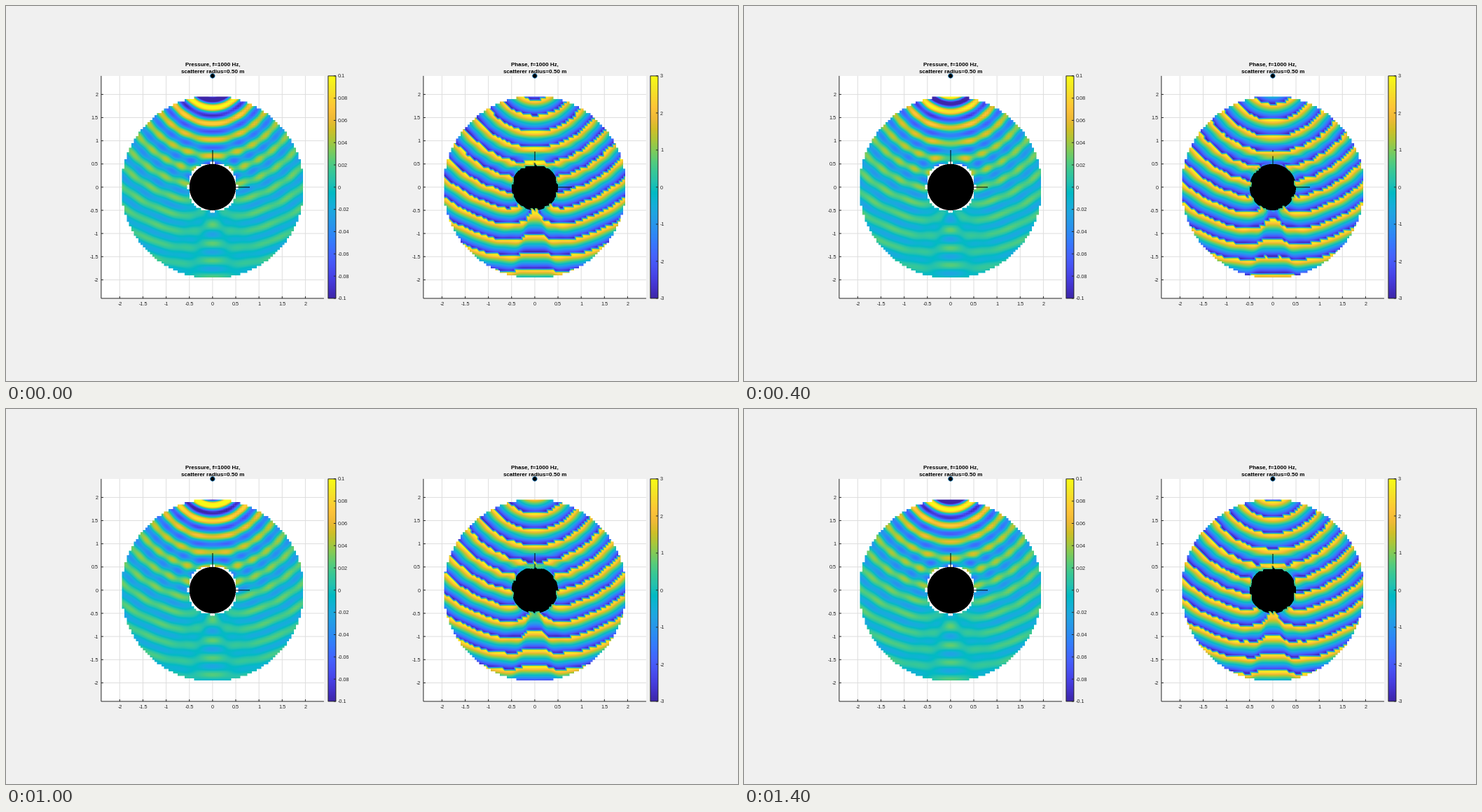
These frames come from a looping animation (1045x536 px, 1.5 s). A matplotlib script:

```python
import numpy as np
import matplotlib.pyplot as plt
from matplotlib.animation import FuncAnimation
from matplotlib.colors import LinearSegmentedColormap
from matplotlib.patches import Circle, Rectangle
from numpy.polynomial.legendre import leggauss, legvander

W, H, DPI = 1045, 536, 64
PX = 72 / DPI                      # points per pixel
FRAMES, INTERVAL = 15, 100
SCALE, HALF, CY = 66.25, 159, 258.9
TOP, SIDE = 100, 318               # field image in pixels
INK = "#262626"
K = 2 * np.pi * 1000 / 343
RADIUS, SOURCE_Y, STEP = 0.5, 2.4, 0.05
ORDER = 30

PARULA = LinearSegmentedColormap.from_list("parula", [
    (.242, .150, .660), (.265, .198, .795), (.278, .256, .899),
    (.281, .323, .958), (.270, .389, .991), (.221, .460, .997),
    (.179, .529, .968), (.154, .590, .922), (.125, .646, .888),
    (.069, .695, .839), (.007, .731, .766), (.141, .758, .684),
    (.216, .784, .592), (.341, .801, .479), (.504, .799, .348),
    (.672, .779, .223), (.820, .750, .154), (.939, .729, .210),
    (.997, .766, .220), (.979, .839, .177), (.960, .914, .142),
    (.977, .984, .081)], N=512)


def hankel(x):
    """Spherical Hankel functions of the first kind, orders 0..ORDER."""
    e = np.exp(1j * x)
    h = [-1j * e / x, -e * (x + 1j) / x**2]
    for n in range(1, ORDER):
        h.append((2 * n + 1) / x * h[n] - h[n - 1])
    return np.array(h)


def bessel(x):
    """Spherical Bessel functions from their Legendre integral."""
    t, w = leggauss(80)
    moments = (w * np.exp(1j * x * t)) @ legvander(t, ORDER)
    return (0.5 * (-1j) ** np.arange(ORDER + 1) * moments).real


def derivative(f, x):
    n = np.arange(1, ORDER + 1)
    return np.concatenate([[-f[1]], f[:-1] - (n + 1) / x * f[1:]])


def total_field(x, y):
    """Point source above a rigid sphere."""
    dist = np.maximum(np.hypot(x, y - SOURCE_Y), 0.1)
    r = np.maximum(np.hypot(x, y), RADIUS)
    n = np.arange(ORDER + 1)
    ka = K * RADIUS
    coef = (2 * n + 1) * derivative(bessel(ka), ka) / derivative(hankel(ka), ka)
    coef = coef * hankel(K * SOURCE_Y)
    legendre = legvander(np.clip(y / r, -1, 1), ORDER)
    scattered = np.einsum("n,nij,ijn->ij", coef, hankel(K * r), legendre)
    return np.exp(1j * K * dist) / (4 * np.pi * dist) - 1j * K / (4 * np.pi) * scattered


node = np.arange(-40, 41)
ni, nj = np.meshgrid(node, node)
rr = ni**2 + nj**2
inside, outside = rr <= 100, rr > 1600
FIELD = total_field(ni * STEP, nj * STEP)


def pressure(wave):
    return np.where(inside | outside, np.nan, wave.real)


def phase(wave):
    return np.where(outside, np.nan, np.where(inside, 0, -np.angle(wave)))


class Surface:
    """Triangulated surface seen from above, with a black sphere in it."""

    def __init__(self, cx, limit, values):
        self.limit, self.values = limit, values
        self.left = int(cx - HALF + 0.5)
        sub = (np.arange(2 * SIDE) + 0.5) / 2
        px, py = np.meshgrid(self.left + sub, TOP + sub)
        x, y = (px - cx) / SCALE, (CY - py) / SCALE
        gx, gy = x / STEP + 40, y / STEP + 40
        self.i = np.clip(np.floor(gx).astype(int), 0, 79)
        self.j = np.clip(np.floor(gy).astype(int), 0, 79)
        self.u, self.v = gx - self.i, gy - self.j
        r2 = x**2 + y**2
        self.ball = r2 < RADIUS**2
        self.height = np.sqrt(np.maximum(RADIUS**2 - r2, 0))
        upright = (abs(px - cx) < 0.5) & (y > 0) & (y < 0.8)
        level = (abs(py - CY) < 0.5) & (x > 0) & (x < 0.8)
        self.axes = upright | level

    def render(self, wave):
        z = self.values(wave)
        i, j, u, v = self.i, self.j, self.u, self.v
        a, b, c, d = z[j, i], z[j, i + 1], z[j + 1, i], z[j + 1, i + 1]
        top = np.where(u + v <= 1, a + u * (b - a) + v * (c - a),
                       d + (1 - u) * (c - d) + (1 - v) * (b - d))
        top[np.isnan(a + b + c + d)] = np.nan
        solid = ~np.isnan(top)
        rgba = PARULA(np.clip((np.nan_to_num(top) / self.limit + 1) / 2, 0, 1))
        black = (self.ball & ~(top > self.height)) | (self.axes & ~(top > 1.5))
        rgba[black] = (0, 0, 0, 1)
        rgba[~solid & ~black] = 0
        # premultiplied 2x2 average
        small = rgba.reshape(SIDE, 2, SIDE, 2, 4).mean(axis=(1, 3))
        small[..., :3] /= np.maximum(small[..., 3:], 1e-6)
        return np.clip(small, 0, 1)


plt.rcParams["font.family"] = "Liberation Sans"
fig = plt.figure(figsize=(W / DPI, H / DPI), dpi=DPI, facecolor="#f0f0f0")
ax = fig.add_axes([0, 0, 1, 1])
ax.axis("off")


def line(x0, y0, x1, y1, color=INK, z=1):
    ax.plot([x0, x1], [y0, y1], color=color, lw=PX, zorder=z,
            solid_capstyle="butt", snap=False)


def label(x, y, text, size=7.3, ha="center", **kw):
    ax.text(x, y, text, fontsize=size * PX, ha=ha, va="baseline", **kw)


def image(data, x0, x1, y0, y1, z):
    return ax.imshow(data, extent=(x0, x1, y1, y0), interpolation="nearest",
                     aspect="auto", zorder=z)


def colorbar(x, limit, step):
    y0, y1 = CY - HALF, CY + HALF
    ramp = PARULA(np.linspace(1, 0, 318))[:, None]
    image(ramp, x, x + 11, 100, 418, 2)
    ax.add_patch(Rectangle((x, y0), 11, y1 - y0, fill=False, ec=INK,
                           lw=PX, zorder=3, snap=False))
    count = round(limit / step)
    for n in range(-count, count + 1):
        y = CY - n / count * HALF
        line(x + 8, y, x + 11, y, z=3)
        label(x + 14, y + 2.6, f"{n * step:g}", ha="left", color=INK)


def panel(cx, title, limit, step, bar_x, values):
    x0, x1, y0, y1 = cx - HALF, cx + HALF, CY - HALF, CY + HALF
    ax.add_patch(Rectangle((x0, y0), x1 - x0, y1 - y0, fc="white", ec="none",
                           zorder=0, snap=True))
    for tick in np.arange(-2, 2.1, 0.5):
        x, y = cx + tick * SCALE, CY - tick * SCALE
        line(x, y0, x, y1, "#dedede", 0.5)
        line(x0, y, x1, y, "#dedede", 0.5)
        line(x, y1, x, y1 - 3)
        line(x0, y, x0 + 3, y)
        label(x, 428.4, f"{tick:g}", color=INK)
        label(x0 - 4, y + 2.6, f"{tick:g}", ha="right", color=INK)
    line(x0, y0, x0, y1)
    line(x0, y1, x1, y1)
    label(cx, 85.8, f"{title}, f=1000 Hz,", 8, weight="bold")
    label(cx, 95.8, "scatterer radius=0.50 m", 8, weight="bold")
    ax.add_patch(Circle((cx, CY - SOURCE_Y * SCALE), 3.2, fc="black",
                        ec="#0072bd", lw=PX * 0.7, zorder=6))
    colorbar(bar_x, limit, step)
    surface = Surface(cx, limit, values)
    art = image(surface.render(FIELD), surface.left, surface.left + SIDE,
                TOP, TOP + SIDE, 4)
    return surface, art


panels = [panel(294.9, "Pressure", 0.1, 0.02, 459.9, pressure),
          panel(754.9, "Phase", 3, 1, 919.9, phase)]
ax.set_xlim(0, W)
ax.set_ylim(H, 0)


def draw(frame):
    wave = FIELD * np.exp(-2j * np.pi * frame / FRAMES)
    for surface, art in panels:
        art.set_data(surface.render(wave))
    return [art for _, art in panels]


anim = FuncAnimation(fig, draw, frames=FRAMES, interval=INTERVAL, repeat=True)
plt.show()
```
